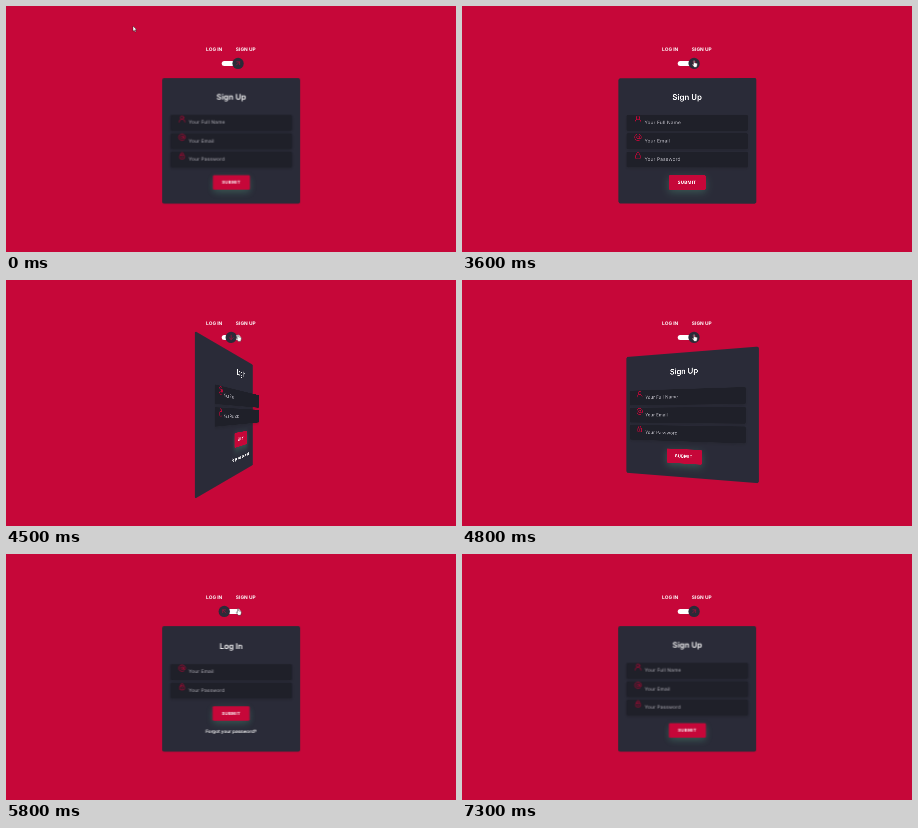
An HTML page for the animation above (7400 ms loop, 450 by 246 pixels).

```html
<!DOCTYPE html>
<html lang="en">
<head>
<meta charset="utf-8">
<title>Log in / Sign up flip card</title>
<style>
  :root { --red: #c60739; --dark: #2a2b38; }
  html, body { margin: 0; width: 100%; height: 100%; overflow: hidden; background: var(--red); }
  #scene {
    position: absolute; left: 0; top: 0; width: 1435px; height: 784px;
    transform: scale(.3136); transform-origin: 0 0;
    font-family: Inter, sans-serif; color: #fff; text-rendering: geometricPrecision;
  }
  #scene > *, .icon { position: absolute; }
  svg { display: block; overflow: visible; }
  .icon { fill: none; stroke: var(--red); stroke-width: 1.8; stroke-linecap: round; stroke-linejoin: round; }

  .label { top: 130px; font: 700 15.5px/20px Inter, sans-serif; white-space: nowrap; }
  .track { left: 687.5px; top: 175px; width: 60px; height: 16px; border-radius: 8px; background: #fff; }
  #knob { position: absolute; left: -10px; top: -10px; width: 36px; height: 36px; border-radius: 50%; background: var(--dark); }
  #knob .icon { left: 6px; top: 6px; }

  .card { left: 497.5px; top: 229.5px; width: 440px; height: 400px; perspective: 800px; }
  #flip, .face { position: absolute; inset: 0; transform-style: preserve-3d; }
  .face { background: var(--dark); border-radius: 6px; backface-visibility: hidden; }
  .back { transform: rotateY(180deg); }
  .content {
    position: absolute; left: 35px; top: 51px; width: 370px; text-align: center;
    transform: translateZ(35px); backface-visibility: hidden;
  }
  .back .content { top: 47px; }
  h4 { margin: 0 0 34px; font: 600 24px/40px Inter, sans-serif; }
  .field {
    position: relative; height: 48px; margin-bottom: 8px; padding-left: 55px; box-sizing: border-box;
    border-radius: 4px; background: #1f2029; box-shadow: 0 4px 8px rgba(21, 21, 21, .2);
    font: 500 14.5px/48px Inter, sans-serif; letter-spacing: .5px; text-align: left; color: #a3a2ab;
  }
  .field .icon { left: 23px; top: 0; }
  .button {
    width: 113px; margin: 24px auto 0; border-radius: 4px; background: var(--red);
    box-shadow: 0 8px 24px rgba(100, 205, 155, .27);
    font: 700 13px/44px Inter, sans-serif; letter-spacing: 1px;
  }
  .link { margin-top: 25px; font: 600 14px/20px Inter, sans-serif; }
  #cursor { left: 0; top: 0; fill: #fff; stroke: #111; stroke-width: 1.2; stroke-linejoin: round; }
</style>
</head>
<body>
<div id="scene">
  <div class="label" style="left:638px">LOG IN</div>
  <div class="label" style="left:733px">SIGN UP</div>
  <div class="track"><div id="knob"></div></div>
  <div class="card"><div id="flip"></div></div>
  <svg id="cursor" width="20" height="24">
    <path id="arrow" d="M0 0V17L4 13.3 6.6 19.3 9.4 18 6.8 12.3H12Z"/>
    <path id="hand" d="M-1.5 1.5a1.7 1.7 0 0 1 3.4 0V8l7 1.4q2 .5 2 2.6l-.8 5-2 5.5H.5L-5 14q-1-2.2 1-2.6L-1.5 13.5Z"/>
  </svg>
</div>
<script>
const $ = id => document.getElementById(id);
const ICONS = {
  user: '<circle cx="12" cy="8" r="5"/><path d="M3 21.5a9 9 0 0 1 18 0"/>',
  at: '<circle cx="12" cy="12" r="4"/><path d="M16 8v5.5a3 3 0 0 0 6 0V12a10 10 0 1 0-4 8"/>',
  lock: '<rect x="5" y="10" width="14" height="12" rx="3"/><path d="M8 10V7a4 4 0 0 1 8 0v3M12 14.5v3"/>',
  arrow: '<path d="M17 17 7 7M7 16V7h9"/>'
};
const icon = name => `<svg class="icon" width="24" height="24">${ICONS[name]}</svg>`;
const field = ([name, text]) => `<div class="field">${icon(name)}${text}</div>`;
const face = (side, title, fields, footer = '') => `
  <div class="face ${side}"><div class="content">
    <h4>${title}</h4>${fields.map(field).join('')}<div class="button">SUBMIT</div>${footer}
  </div></div>`;

const credentials = [['at', 'Your Email'], ['lock', 'Your Password']];
$('knob').innerHTML = icon('arrow');
$('flip').innerHTML =
  face('front', 'Log In', credentials, '<div class="link">Forgot your password?</div>') +
  face('back', 'Sign Up', [['user', 'Your Full Name'], ...credentials]);

const LOOP = 7400, SCALE = .3136;
const CLICKS = [3600, 4354, 5097, 5840];
// Cursor path: time, x, y in stage pixels
const PATH = [
  [0, 127, 20], [1680, 127, 20], [2000, 206.5, 55.5], [2300, 231.5, 54.3], [2450, 231.5, 54.3],
  [2800, 284.5, 5.5], [3180, 232, 54.3], [5920, 232, 54.3], [6300, 423, 30], [6400, 470, 27]
];

function bezier(x1, y1, x2, y2) {
  const at = (a, b, u) => 3 * a * u * (1 - u) ** 2 + 3 * b * u * u * (1 - u) + u ** 3;
  return x => {
    if (x >= 1) return 1;
    let low = 0, high = 1;
    for (let i = 0; i < 24; i++) {
      const mid = (low + high) / 2;
      if (at(x1, x2, mid) < x) low = mid; else high = mid;
    }
    return at(y1, y2, low);
  };
}
const ease = bezier(.25, .1, .25, 1), easeOut = bezier(0, 0, .58, 1);

// 0 = log in, 1 = sign up
function toggled(t, duration, curve) {
  const count = CLICKS.filter(click => click <= t).length;
  const p = count ? curve((t - CLICKS[count - 1]) / duration) : 1;
  return count % 2 ? 1 - p : p;
}

function cursorAt(t) {
  const next = PATH.findIndex(point => point[0] > t);
  if (next < 0) return null;
  const [t0, x0, y0] = PATH[next - 1], [t1, x1, y1] = PATH[next];
  const u = (t - t0) / (t1 - t0), p = u * u * (3 - 2 * u);
  return [x0 + (x1 - x0) * p, y0 + (y1 - y0) * p];
}

function draw(now) {
  const t = now % LOOP;
  const knob = toggled(t, 500, ease);
  $('flip').style.transform = `rotateY(${180 * toggled(t, 600, easeOut)}deg)`;
  $('knob').style.transform = `translateX(${44 * knob}px) rotate(${-270 * knob}deg)`;

  const position = cursorAt(t);
  $('cursor').style.display = position ? '' : 'none';
  if (position) {
    const [x, y] = position;
    const hovering = x > 215 && x < 238 && y > 51 && y < 63;
    $('cursor').style.transform = `translate(${x / SCALE}px, ${y / SCALE}px)`;
    $('arrow').style.display = hovering ? 'none' : '';
    $('hand').style.display = hovering ? '' : 'none';
  }
  requestAnimationFrame(draw);
}
requestAnimationFrame(draw);
</script>
</body>
</html>
```
